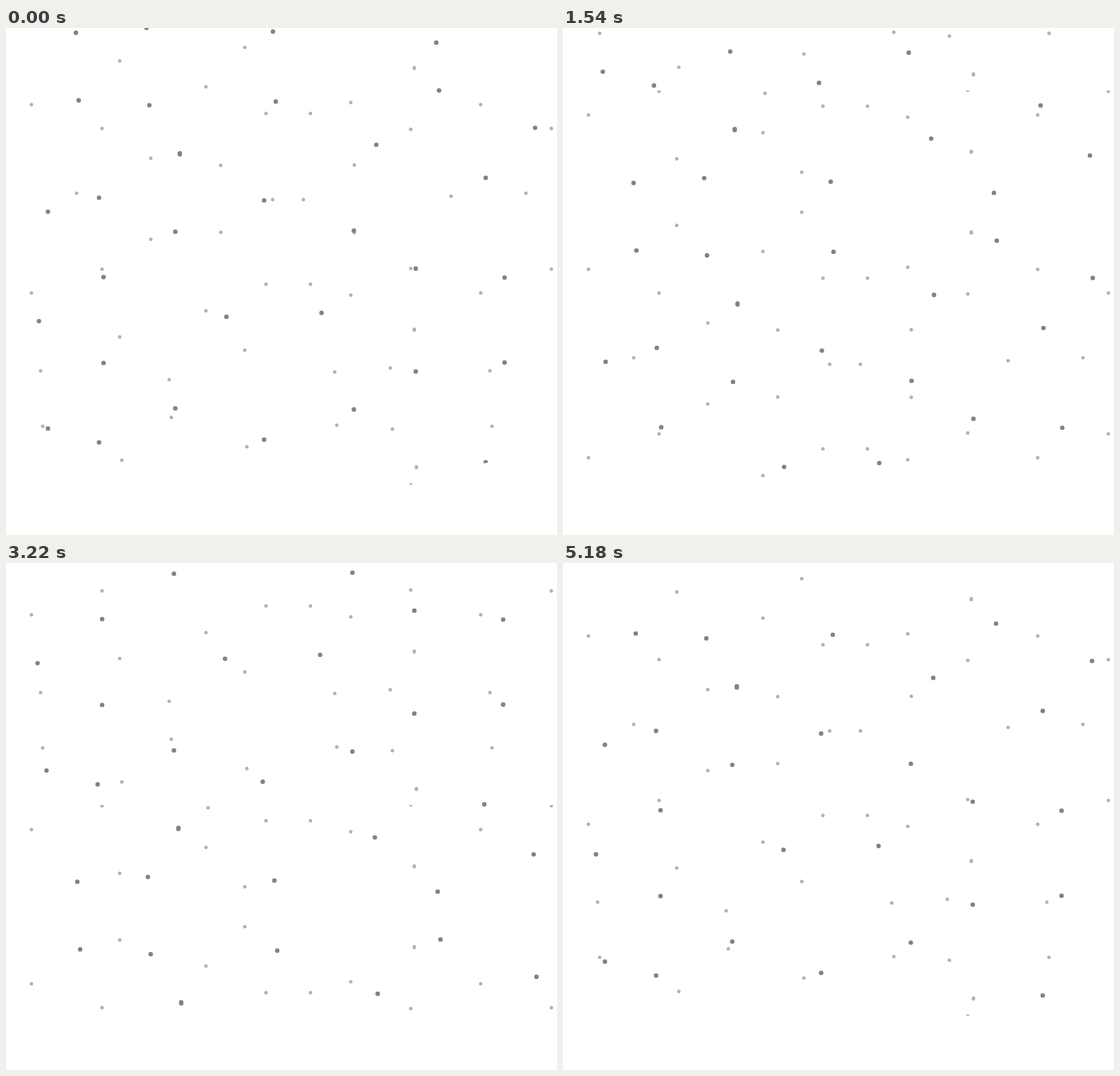
These frames come from a looping animation (780 px wide and 718 px high, 5250 ms). An HTML page with a canvas:

```html
<!DOCTYPE html>
<html lang="en">
<head>
<meta charset="utf-8">
<title>Falling dots</title>
<style>
  html, body { margin: 0; width: 100%; height: 100%; overflow: hidden; background: #fff; }
  canvas { display: block; }
</style>
</head>
<body>
<canvas id="stage" width="780" height="718"></canvas>
<script>
const WIDTH = 780, HEIGHT = 718;
const STEP = 70, LOOP = 5250;
const TILE = 636, HALF = 282.8, RADIUS = 2.5;
const ctx = document.getElementById('stage').getContext('2d');

// Both layers show one motif: dots mirrored above and below its axis, repeated sideways.
const mirrored = [
  [36, 133.4], [49, 243.6], [136, 99.7], [161, 195.5], [205, 57.4], [231, 256],
  [283, 158.6], [304, 47.4], [338, 214.4], [368, 120.9], [431, 120.9], [465.3, 245],
  [488, 136.4], [493, 47.9], [544, 239.6], [573, 98.5], [578, 184.9], [578, 186]
];
const nearAxis = [[100, -8], [377.5, 1.2], [421, 1.2], [630, -3.7]];

const motif = new Path2D();
const points = [...mirrored, ...mirrored.map(([x, y]) => [x, -y]), ...nearAxis];
for (const tile of [-1, 0, 1]) {
  for (const [x, y] of points) {
    motif.moveTo(x + tile * TILE + RADIUS, y);
    motif.arc(x + tile * TILE, y, RADIUS, 0, 2 * Math.PI);
  }
}

// A strip is a stack of motif windows; axis is a stage height, top and bottom are motif units.
const layers = [
  {
    color: '#b2b2b2', scale: 1, left: 0, speed: 0.1514, period: 789.6, drift: 0,
    windows: [
      { axis: -243.4, top: 98.7, bottom: 237, shift: 0 },
      { axis: 241.9, top: -237, bottom: HALF, shift: 0 },
      { axis: 241.9 + 2 * HALF, top: -HALF, bottom: -155, shift: 3 }
    ],
    floor: [[0, 636], [340, 639], [543, 652.5], [690, 655.3], [736, 650], [780, 632]]
  },
  {
    color: '#80808f', scale: 1.27, left: 319.7, speed: 0.1381, period: 718, drift: 4,
    windows: [{ axis: 413.6, top: -HALF, bottom: HALF, shift: 0 }],
    floor: [[0, 593], [400, 669], [780, 597]]
  }
];

function clipToFloor(floor) {
  ctx.beginPath();
  ctx.moveTo(WIDTH, 0);
  ctx.lineTo(0, 0);
  floor.forEach(([x, y]) => ctx.lineTo(x, y));
  ctx.clip();
}

function drawWindow({ axis, top, bottom, shift }, scale, dx, dy) {
  ctx.save();
  ctx.translate(dx + shift, axis + dy);
  ctx.scale(scale, scale);
  ctx.beginPath();
  ctx.rect(-TILE, top, 3 * TILE, bottom - top);
  ctx.clip();
  ctx.fill(motif);
  ctx.restore();
}

function drawLayer({ color, scale, left, speed, period, drift, windows, floor }, time) {
  const fall = speed * time;
  const slide = Math.round(drift * fall / period);
  ctx.save();
  clipToFloor(floor);
  ctx.fillStyle = color;
  for (const strip of [-1, 0, 1]) {
    for (const part of windows) {
      drawWindow(part, scale, left + slide + drift * strip, fall + period * strip);
    }
  }
  ctx.restore();
}

const start = performance.now();

function frame() {
  const elapsed = (performance.now() - start) % LOOP;
  const time = Math.floor(elapsed / STEP) * STEP;
  ctx.clearRect(0, 0, WIDTH, HEIGHT);
  layers.forEach(layer => drawLayer(layer, time));
  requestAnimationFrame(frame);
}
frame();
</script>
</body>
</html>
```
